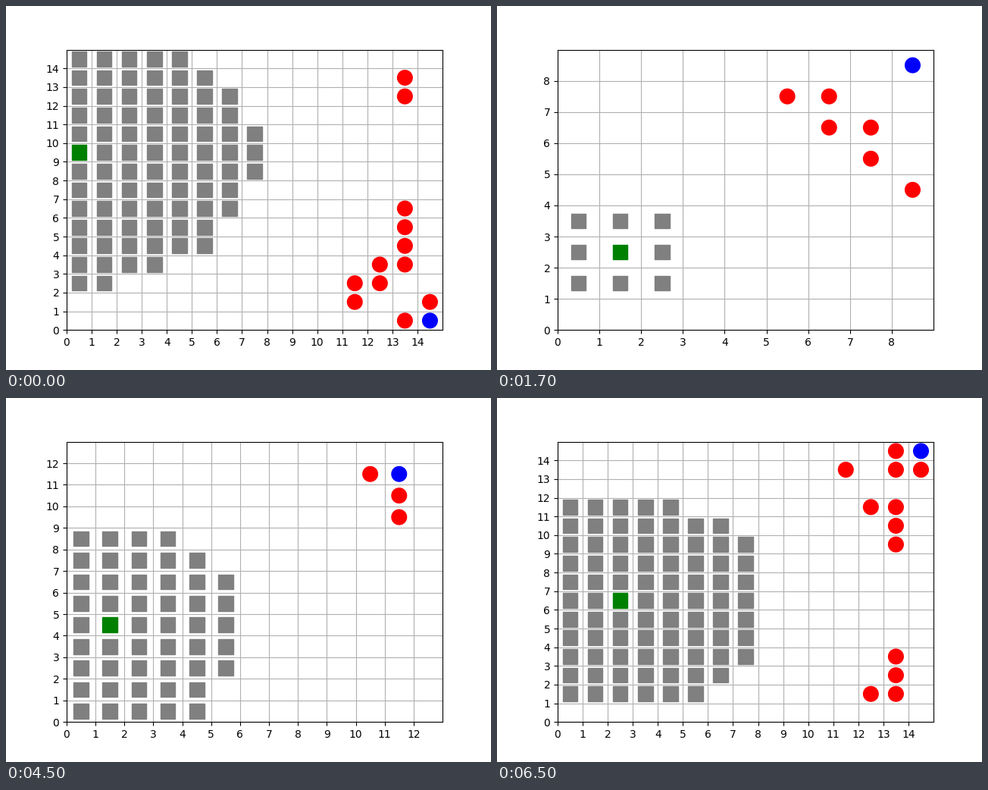
Recreate the animation shown at these times as a matplotlib script. Size 640x480 px, loop 8000 ms.

```python
from itertools import product

import matplotlib.pyplot as plt
from matplotlib.animation import FuncAnimation

INTERVAL = 500  # ms per step


def scene(steps, size, seeker, target, walls):
    """Describe one board; each wall is (column, bottom row, height)."""
    obstacles = [(col, row + i) for col, row, height in walls
                 for i in range(height)]
    return steps, size, seeker, target, obstacles


def flipped(board):
    steps, size, *cells, obstacles = board

    def flip(cell):
        return cell[0], size - 1 - cell[1]

    return steps, size, *map(flip, cells), [flip(cell) for cell in obstacles]


corner = scene(4, 13, (1, 8), (11, 1), [(10, 1, 1), (11, 2, 2)])
SCENES = [
    scene(1, 15, (0, 9), (14, 0),
          [(11, 1, 2), (12, 2, 2), (13, 0, 1), (13, 3, 4), (13, 12, 2),
           (14, 1, 1)]),
    scene(4, 9, (1, 2), (8, 8),
          [(5, 7, 1), (6, 6, 2), (7, 5, 2), (8, 4, 1)]),
    corner,
    flipped(corner),
    scene(3, 15, (2, 6), (14, 14),
          [(11, 13, 1), (12, 1, 1), (12, 11, 1), (13, 1, 3), (13, 9, 3),
           (13, 13, 2), (14, 13, 1)]),
]
TIMELINE = [board for board in SCENES for _ in range(board[0])]

fig, ax = plt.subplots(figsize=(6.4, 4.8), dpi=100)


def explored_cells(size, seeker):
    """Return the cells nearest the seeker, itself first, ties by row."""
    def distance(cell):
        return (cell[0] - seeker[0]) ** 2 + (cell[1] - seeker[1]) ** 2

    cells = [(col, row) for row, col in product(range(size), repeat=2)]
    return sorted(cells, key=distance)[:(size - 6) ** 2]


def mark(cells, marker, first_color, color):
    xs, ys = zip(*cells)
    colors = [first_color] + [color] * (len(cells) - 1)
    ax.scatter([x + 0.5 for x in xs], [y + 0.5 for y in ys],
               s=200, c=colors, marker=marker)


def draw(step):
    _, size, seeker, target, obstacles = TIMELINE[step]
    ax.clear()
    mark(explored_cells(size, seeker), "s", "green", "gray")
    mark([target] + obstacles, "o", "blue", "red")
    ax.set(xlim=(0, size), ylim=(0, size),
           xticks=range(size), yticks=range(size))
    ax.grid(True)
    return ax.collections


anim = FuncAnimation(fig, draw, frames=len(TIMELINE), interval=INTERVAL,
                     repeat=True, repeat_delay=0)
plt.show()
```
